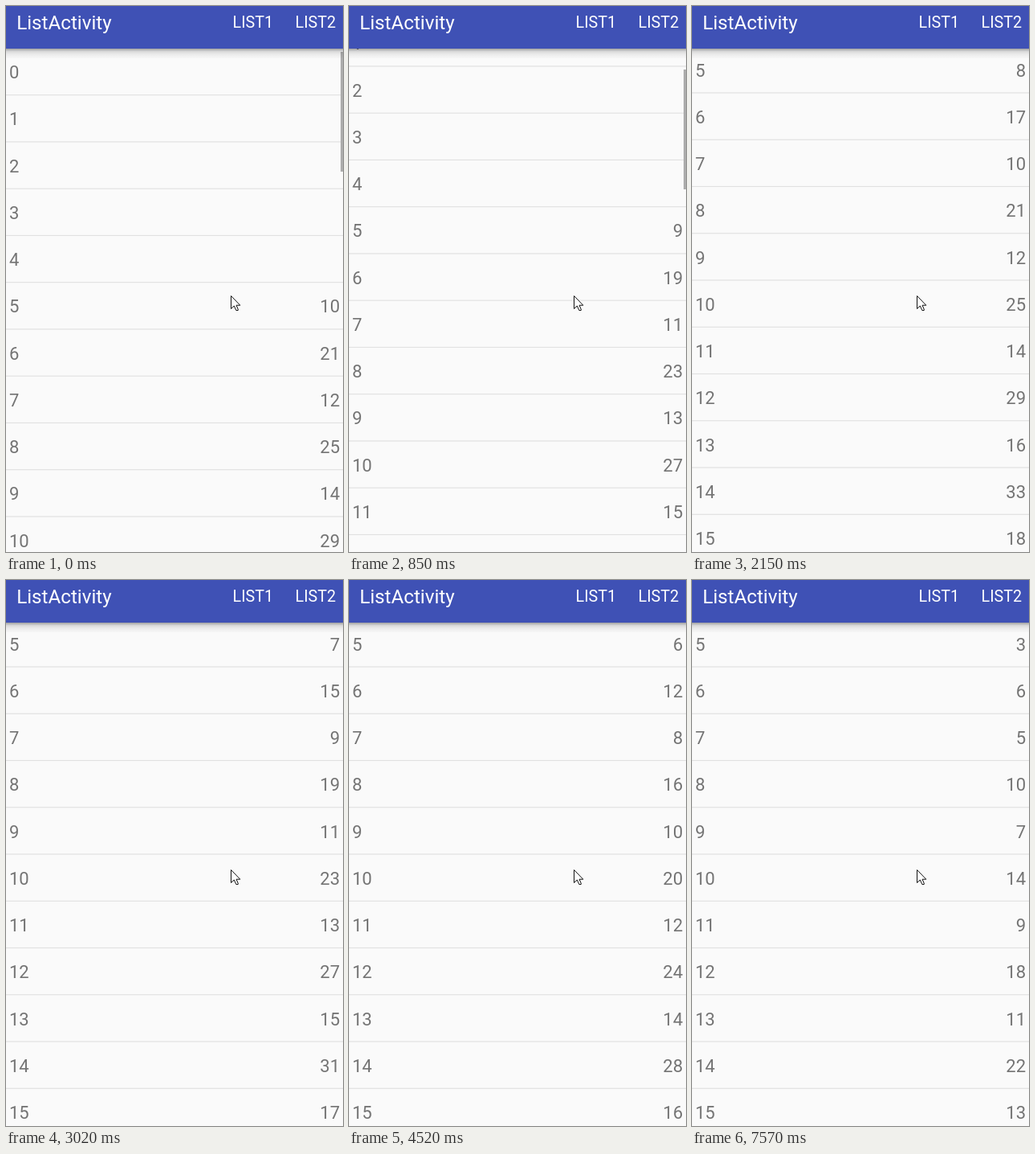
An HTML page with a canvas that plays this animation: 420 px wide and 679 px high, repeating every 8 s.

```html
<!DOCTYPE html>
<html lang="en">
<head>
<meta charset="utf-8">
<title>ListActivity</title>
<style>
  html, body { margin: 0; width: 100%; height: 100%; overflow: hidden; background: #fafafa; }
  canvas { display: block; width: 420px; height: 679px; }
</style>
</head>
<body>
<canvas id="stage" width="420" height="679"></canvas>
<script>
const W = 420, H = 679, LOOP = 8000;
const BAR_H = 53, ROW_H = 58.25, FIRST_BASELINE = 90.2, FIRST_COUNTED = 5;
const REFRESH = 216, REFRESH_LEAD = 30;
const COUNT_START = 205, ODD_PERIOD = 1160, EVEN_PERIOD = 524;
const THUMB_HOLD = 640;
const ctx = document.getElementById('stage').getContext('2d');

const flicks = [{ at: 0, to: 0 }, { at: 850, to: 94 }, { at: 1500, to: 293.93 }];
// Refreshes between these pairs are dropped: the counters freeze, then catch up.
const stalls = [[10, 14], [21, 29]];

function shownTime(t) {
  let refresh = Math.floor((t + REFRESH_LEAD) / REFRESH);
  for (const [from, to] of stalls) if (refresh > from && refresh < to) refresh = from;
  return refresh * REFRESH;
}

const ticks = (t, period) => Math.floor((t - COUNT_START) / period) + 1;

function countFor(row, t) {
  return row % 2
    ? row + 5 - Math.max(0, ticks(t, ODD_PERIOD))
    : 2 * row + 9 - Math.max(0, ticks(t, EVEN_PERIOD));
}

function text(str, x, y, size, color, align = 'left') {
  ctx.font = `${size}px Roboto, sans-serif`;
  ctx.fillStyle = color;
  ctx.textAlign = align;
  ctx.fillText(str, x, y);
}

function drawRows(t, scroll) {
  for (let row = 0; row < 17; row++) {
    const y = FIRST_BASELINE + row * ROW_H - scroll;
    if (y < BAR_H - 20 || y > H + 20) continue;
    text(row, 4, y, 22, '#747474');
    if (row >= FIRST_COUNTED) text(countFor(row, t), 416, y, 22, '#747474', 'right');
    ctx.fillStyle = '#e1e1e1';
    ctx.fillRect(0, y + 19.9, W, 1.17);
  }
}

function drawThumb(scroll) {
  ctx.fillStyle = '#adadad';
  ctx.fillRect(417, Math.round(57 + scroll * 0.234), 3, 149);
}

function drawToolbar() {
  const shadow = ctx.createLinearGradient(0, BAR_H, 0, BAR_H + 12);
  shadow.addColorStop(0, 'rgba(0,0,0,0.36)');
  shadow.addColorStop(0.3, 'rgba(0,0,0,0.13)');
  shadow.addColorStop(0.6, 'rgba(0,0,0,0.06)');
  shadow.addColorStop(1, 'rgba(0,0,0,0.01)');
  ctx.fillStyle = shadow;
  ctx.fillRect(0, BAR_H, W, 12);
  ctx.fillStyle = '#3f51b5';
  ctx.fillRect(0, 0, W, BAR_H);
  text('ListActivity', 13.2, 29, 24.2, '#fff');
  text('LIST1', 282.6, 27, 19.7, '#fff');
  text('LIST2', 360.6, 27, 19.7, '#fff');
}

const arrow = new Path2D('M280.5 360.5V376.5L284.3 373L286.8 378.5H289.2V377L287 372.2H291.8Z');

function drawCursor() {
  ctx.fillStyle = '#fff';
  ctx.fill(arrow);
  ctx.strokeStyle = '#111';
  ctx.lineWidth = 1;
  ctx.stroke(arrow);
}

function draw(t) {
  const flick = flicks.filter(({ at }) => t >= at).pop();
  ctx.fillStyle = '#fafafa';
  ctx.fillRect(0, 0, W, H);
  drawRows(shownTime(t), flick.to);
  if (t - flick.at < THUMB_HOLD) drawThumb(flick.to);
  drawToolbar();
  drawCursor();
}

const begin = performance.now();
function tick() {
  draw((performance.now() - begin) % LOOP);
  requestAnimationFrame(tick);
}
tick();
</script>
</body>
</html>
```
